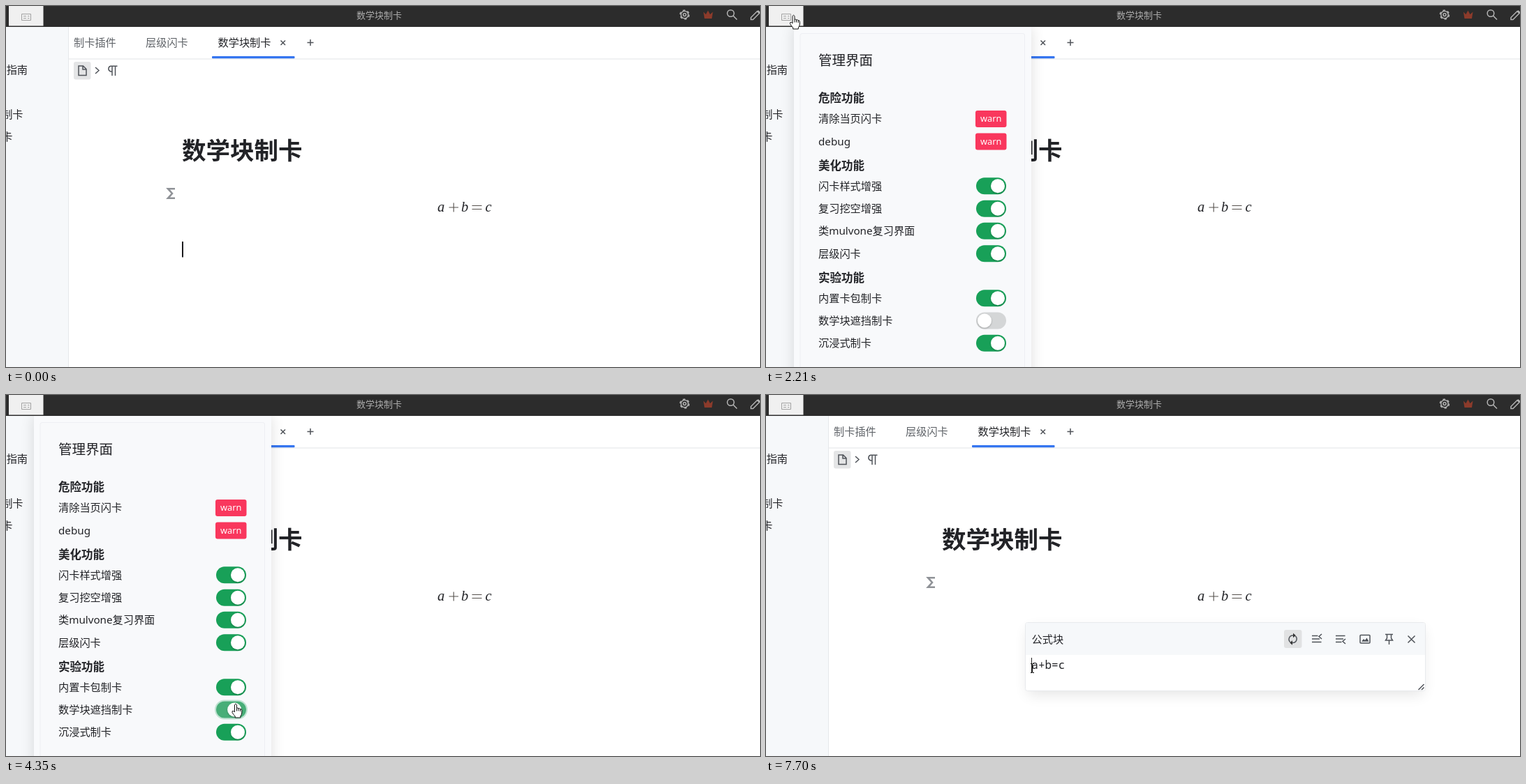
An HTML page for the animation above (8 s loop, 1080 by 518 pixels).

```html
<!DOCTYPE html>
<html lang="zh-CN">
<head>
<meta charset="utf-8">
<style>
html, body { margin: 0; width: 100%; height: 100%; overflow: hidden; background: #fff; }
svg { display: block; width: 1080px; height: 518px; }
text { font: 15.2px "Noto Sans", "Noto Sans CJK SC", "Noto Sans CJK", sans-serif; fill: #222327; white-space: pre; }
.muted { fill: #5f6368; }
.head { font-size: 16.5px; font-weight: 700; }
.code { font: 16px "Noto Sans Mono", monospace; }
.math { font: italic 20.5px "Liberation Serif", serif; }
.line { fill: none; stroke: #4f5359; stroke-width: 1.5; }
.light { fill: none; stroke: #b4b4b4; stroke-width: 1.5; }
.pointer { fill: #fff; stroke: #111; stroke-width: 1; stroke-linejoin: round; }
</style>
</head>
<body>
<svg viewBox="0 0 1080 518">
  <defs>
    <filter id="blur" x="-20%" y="-60%" width="140%" height="220%"><feGaussianBlur stdDeviation="10"/></filter>
    <filter id="soft" x="-40%" y="-40%" width="180%" height="180%"><feDropShadow dx="0" dy="1" stdDeviation="1" flood-opacity=".3"/></filter>
    <clipPath id="below"><rect y="30" width="1080" height="488"/></clipPath>
  </defs>
  <rect width="1080" height="518" fill="#fff"/>

  <!-- sidebar -->
  <rect y="30" width="89" height="488" fill="#f6f8fa"/>
  <path d="M89.5 30V518" stroke="#e6e8eb"/>
  <g text-anchor="end">
    <text x="31" y="97">指南</text>
    <text x="24.5" y="161">制卡</text>
    <text x="9.5" y="193">卡</text>
  </g>

  <!-- tabs and breadcrumb -->
  <path d="M90 76H1080" stroke="#e2e4e7"/>
  <text class="muted" x="97" y="58">制卡插件</text>
  <text class="muted" x="200" y="58">层级闪卡</text>
  <text x="303.5" y="58">数学块制卡</text>
  <rect x="295" y="72" width="118.500" height="3.300" rx="1" fill="#3575f0"/>
  <path class="line" d="M393.500 49.500L400 56M400 49.500L393.500 56M431.500 52.500H440.500M436 48V57"/>
  <rect x="97" y="80" width="24.500" height="25.500" rx="3" fill="#e4e5e6"/>
  <path class="line" d="M104 86H110.500L115 90.500V99.500H104ZM110 86V91H115M128 88L133 92.500L128 97"/>
  <path class="line" d="M159.500 86.200H150A4 4 0 0 0 150 94H152M152 86.200V100M156.500 86.200V100"/>

  <!-- document -->
  <text x="252" y="220" style="font-size:34.5px;font-weight:700">数学块制卡</text>
  <path d="M242 262.200H232L238 269L232 275.800H242" fill="none" stroke="#8f9297" stroke-width="2.600"/>
  <text class="math" x="618" y="295">a</text>
  <text class="math" x="652" y="295">b</text>
  <text class="math" x="686.500" y="295">c</text>
  <path d="M634.500 289H648M641.200 282.500V295.500M667.500 286.500H681.500M667.500 291.500H681.500" stroke="#55504c" stroke-width="1.100"/>
  <rect id="caret" x="252" y="338" width="2" height="22.500" fill="#1b1b1d"/>

  <g id="panel" clip-path="url(#below)">
    <rect x="40" y="30" width="340" height="510" fill="#000" opacity=".13" filter="url(#blur)"/>
    <rect x="40" y="30" width="340" height="488" fill="#f9fafc"/>
    <path d="M49 518V42Q49 39.500 52 39.500H368Q370.500 39.500 370.500 42V518" fill="#f8f9fb" stroke="#eeeff3"/>
    <text x="75" y="85" style="font-size:19.5px">管理界面</text>
    <g id="rows"></g>
  </g>

  <g id="dialog">
    <rect x="375" y="336" width="566" height="94" fill="#000" opacity=".1" filter="url(#blur)"/>
    <rect x="371.500" y="326.500" width="573" height="98" rx="3" fill="#fff" stroke="#e8eaed"/>
    <path d="M372 373V329Q372 327 374 327H942Q944 327 944 329V373Z" fill="#f6f8fa"/>
    <text x="380.500" y="356">公式块</text>
    <rect x="742" y="337" width="25.500" height="26" rx="3" fill="#e1e2e3"/>
    <path class="line" d="M750.800 354.500A5.500 5.500 0 0 1 754.500 345H757M758.200 345.800A5.500 5.500 0 0 1 754.500 355.500H752"/>
    <path d="M755 341.800L758.800 345L755 348.200ZM754 352.300L750.200 355.500L754 358.700Z" fill="#333"/>
    <path class="line" d="M782 345.500H790.500M782 350H793M782 354.500H795.500M796 343L792 346.500L796 350"/>
    <path class="line" d="M816 345.500H829.500M816 350H827M816 354.500H824.500M830 350L826 353.500L830 357"/>
    <rect class="line" x="851" y="344.500" width="14" height="11.500" rx="1"/>
    <path d="M853 353.800L856 350L858 352L860.500 348.500L863.500 353.800Z" fill="#4f5359"/>
    <path class="line" d="M887 343.500H898M889.500 344V349L887.500 352H897.500L895.500 349V344M892.500 352V358M919.500 345.500L929.500 355.500M929.500 345.500L919.500 355.500"/>
    <path class="line" d="M934.500 423L942.500 415M939 423L942.500 419.500"/>
    <rect id="selection" x="380" y="377" width="49" height="21" fill="#3390ff"/>
    <text id="formula" class="code" x="380.300" y="393">a+b=c</text>
    <rect id="inputCaret" x="380" y="377" width="1" height="21" fill="#222"/>
  </g>

  <!-- title bar -->
  <rect width="1080" height="30" fill="#2c2c2c"/>
  <text x="502" y="18" style="font-size:13px;fill:#adadad">数学块制卡</text>
  <circle class="light" cx="972" cy="12.500" r="5.200"/>
  <circle class="light" cx="972" cy="12.500" r="6.500" stroke-dasharray="3.400 3.407"/>
  <circle class="light" cx="972" cy="12.500" r="2"/>
  <path d="M999 8.500L1002.500 12L1005.500 6.500L1008.500 12L1012.500 8.500L1011 18H1000.500Z" fill="#8c3b2b"/>
  <circle class="light" cx="1038" cy="10.500" r="4.800"/>
  <path class="light" d="M1041.500 14L1047 19.500M1067 19.500V16.500L1076 7.500L1079 10.500L1070 19.500ZM1077 6.500L1080 9.500"/>
  <rect id="button" x="4" width="49.500" height="28.500"/>
  <path d="M22.500 11.500H35.500V20.500H22.500ZM25 14.500H29M25 17.500H29M31 14.500H33.500M31 17.500H33.500" fill="none" stroke="#a2a2a2"/>
  <rect id="press" x="12" width="34" height="28" fill="#9e9ea2"/>

  <g id="cursor">
    <path id="arrow" class="pointer" d="M0 0V13.500L3.200 10.600 5.300 15.600 7.500 14.700 5.400 9.800H9.700Z"/>
    <path id="hand" class="pointer" d="M-1.500 1.500Q0-1.200 1.500 1.500V6.500Q3 5 4 7Q5.800 5.800 6.600 7.800Q8.500 7 8.800 9.500V13Q8.500 16 6.800 18V20H-.8V18Q-3 16-5 12.500Q-5.500 9.800-3 10.500L-1.500 12ZM1.500 6.500V10.500M4 7V10.500M6.600 7.800V11"/>
    <path id="beam" d="M-2.500-6.500H-.5L0-6L.5-6.500H2.500M0-6V6M-2.500 6.500H-.5L0 6L.5 6.500H2.500" fill="none" stroke="#111"/>
  </g>
</svg>
<script>
const $ = id => document.getElementById(id);
const show = (id, on) => { $(id).style.display = on ? '' : 'none'; };

// label, centre line, kind
const rows = [
  ['危险功能', 133, 'head'], ['清除当页闪卡', 162, 'warn'], ['debug', 194.5, 'warn'],
  ['美化功能', 229.5, 'head'], ['闪卡样式增强', 258.5, 'on'], ['复习挖空增强', 291, 'on'],
  ['类mulvone复习界面', 323, 'on'], ['层级闪卡', 355.5, 'on'],
  ['实验功能', 390.5, 'head'], ['内置卡包制卡', 419.5, 'on'], ['数学块遮挡制卡', 451.7, 'live'], ['沉浸式制卡', 484, 'on']
];
const warn = y => `<rect x="300" y="${y - 12}" width="44.500" height="24" rx="3" fill="#f9375d"/>
  <text x="322.200" y="${Math.round(y + 4.2)}" text-anchor="middle" style="font-size:12.8px;font-weight:500;fill:#fff">warn</text>`;
const toggle = (y, kind) => `<rect ${kind === 'live' ? 'id="track"' : ''} x="301" y="${y - 12.2}" width="43" height="24" rx="12" fill="#18a058"/>
  <circle ${kind === 'live' ? 'id="knob"' : ''} cx="332" cy="${y - .2}" r="10" fill="#fff" filter="url(#soft)"/>`;
$('rows').innerHTML = rows.map(([label, y, kind]) =>
  `<text class="${kind}" x="75" y="${Math.round(y + 5.4)}">${label}</text>` +
  (kind === 'head' ? '' : kind === 'warn' ? warn(y) : toggle(y, kind))).join('');
$('track').insertAdjacentHTML('beforebegin',
  '<rect id="ring" x="300" y="438.500" width="45" height="26" rx="13" fill="none" stroke="#18a058" stroke-width="2" opacity=".25"/>');

// time, x, y, shape
const path = [
  [0, 0, 0, ''], [240, 953, 475, 'arrow'], [760, 150, 0, 'arrow'], [800, 150, 0, ''],
  [950, 64, 5, 'arrow'], [1010, 66, 27, 'arrow'], [1070, 46, 18, 'hand'], [1180, 46, 18, 'hand'],
  [1330, 32, 7, 'hand'], [1600, 36, 20, 'hand'], [1810, 39.5, 13, 'hand'],
  [2770, 39.5, 13, 'arrow'], [3070, 211, 298, 'arrow'], [3550, 302, 447, 'arrow'], [3660, 302, 447, 'arrow'],
  [3680, 308, 447, 'hand'], [3810, 315, 446, 'hand'], [4040, 315, 446, 'hand'], [4280, 329, 443, 'hand'],
  [4390, 329, 443, 'arrow'], [4810, 610, 312, 'arrow'], [4870, 610, 312, 'arrow'],
  [4950, 640.5, 289.5, 'hand'], [5570, 640.5, 289.5, 'arrow'], [5790, 464, 374, 'beam'],
  [5820, 434, 382.5, 'beam'], [6020, 392, 392, 'beam'], [6140, 392, 392, 'beam'], [6240, 381.5, 392, 'beam']
];

function moveCursor(t) {
  const i = path.findLastIndex(k => k[0] <= t);
  const [t0, x0, y0, shape] = path[i], [t1, x1, y1] = path[i + 1] || [8000, x0, y0];
  const p = (t - t0) / (t1 - t0);
  $('cursor').setAttribute('transform', `translate(${x0 + (x1 - x0) * p} ${y0 + (y1 - y0) * p})`);
  for (const s of ['arrow', 'hand', 'beam']) show(s, s === shape);
}

const mix = (a, b, p) => `rgb(${a.map((v, i) => Math.round(v + (b[i] - v) * p))})`;

function draw(t) {
  const pressed = t >= 1950 && t < 2210;
  $('button').setAttribute('fill', pressed ? '#e5e5e5' : '#f0f0f0');
  show('press', t >= 2020 && t < 2210);
  show('caret', t < 2210 && !(t >= 240 && t < 780) && !(t >= 1300 && t < 1810));
  show('panel', t >= 2210 && t < 5350);

  const p = Math.min(1, Math.max(0, (t - 4150) / 300));
  const slide = p * p * (3 - 2 * p);
  $('knob').setAttribute('cx', 313 + 19 * slide);
  $('track').setAttribute('fill', mix([212, 214, 215], [24, 160, 88], slide));
  show('ring', p > 0);

  const selected = t < 6640;
  show('dialog', t >= 5350);
  show('selection', selected);
  $('formula').style.fill = selected ? '#fff' : '';
  show('inputCaret', !selected && (t < 7170 || t >= 7700));
  moveCursor(t);
}

const start = performance.now();
function tick() {
  draw((performance.now() - start) % 8000);
  requestAnimationFrame(tick);
}
tick();
</script>
</body>
</html>
```
